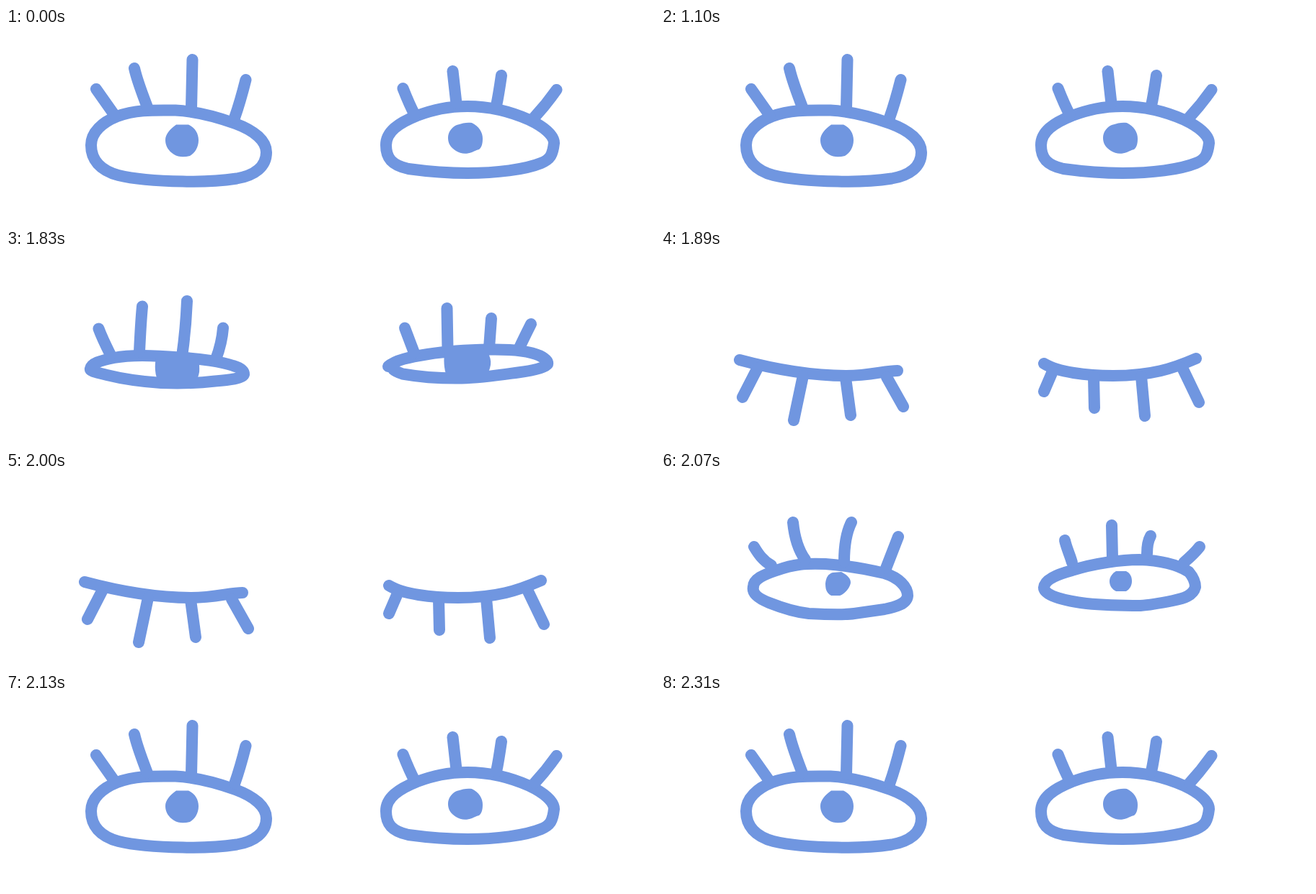
Animation of 900x270 px, one loop 2430 ms. Source, as an HTML page:

```html
<!DOCTYPE html>
<html lang="en">
<head>
<meta charset="utf-8">
<title>Blinking eyes</title>
<style>
  html, body { margin: 0; width: 100%; height: 100%; overflow: hidden; background: #fff; }
  svg { display: block; width: 900px; height: 270px; }

  .line { fill: none; stroke: #7096e0; stroke-width: 16; stroke-linecap: round; stroke-linejoin: round; }
  .pupil { fill: #7096e0; }

  /* One blink every 2430 ms; poses switch without blending. */
  .pose { visibility: hidden; animation: 2430ms step-end infinite; }
  .open { animation-name: open; }
  .closing { animation-name: closing; }
  .closed { animation-name: closed; }
  .opening { animation-name: opening; }

  @keyframes open {
    0% { visibility: visible; }
    75.3086% { visibility: hidden; }
    87.6543%, 100% { visibility: visible; }
  }
  @keyframes closing {
    0% { visibility: hidden; }
    75.3086% { visibility: visible; }
    77.7778%, 100% { visibility: hidden; }
  }
  @keyframes closed {
    0% { visibility: hidden; }
    77.7778% { visibility: visible; }
    85.1852%, 100% { visibility: hidden; }
  }
  @keyframes opening {
    0% { visibility: hidden; }
    85.1852% { visibility: visible; }
    87.6543%, 100% { visibility: hidden; }
  }
</style>
</head>
<body>
<svg viewBox="0 0 900 270">
  <g class="pose open">
    <path class="line" d="M118 163C118 145 134 131 154 123C178 114 200 114 235 114.5C262 116 290 123 318 133C345 143 361 157 361 173C361 193 345 205 320 209.5C290 214 262 214 245 213.5C215 213 180 211 156 205C130 198 118 183 118 163Z"/>
    <path class="line" d="M125 85L151 122M178 56C182 74 190 94 196 110M258.5 44L257 112M332.5 72C328 90 323 108 317 125"/>
    <path class="pupil" d="M236 134.5H253C262 138 267 147 267 156C267 166 262 174 255 178C247 180 239 180 233 176C225 171 221 164 221 156C221 148 227 141 236 134.5Z"/>

    <path class="line" d="M527 163C527 144 545 132 570 122C592 114 612 109 640 109C670 109 698 115.5 726 128C745 137 760 149 760 160C758 178 754 183 742 188C720 197 680 202 640 202C610 202 580 199 558 196C535 191 527 181 527 163Z"/>
    <path class="line" d="M550.5 84C556 98 561 110 567 121M619.5 60L624.5 105M687 66C685 80 683 94 680 108M763.5 86C755 98 743 113 733 124"/>
    <path class="pupil" d="M625 135C634 132 640 131 646 132C656 137 661 145 661 154C661 160 660 166 656 169C652 170 650 171 646 173C638 176 630 175 624 171C616 166 613 160 613 153C613 145 618 138 625 135Z"/>
  </g>

  <g class="pose closing">
    <path class="line" d="M117 165C118 158 130 154 150 150C170 146 200 146 240 149.5C270 151 300 156 315 161C325 164 330 168 330 173C328 179 310 181 290 182.5C265 185.5 240 186 215 185C185 183 160 179 140 174C125 170 116 169 117 165Z"/>
    <path class="line" d="M128.5 109.5C133 122 139 134 145 146M189 78.5C187 100 186 120 185 142M251 71C250 95 248 120 244 148M301 108.5C300 122 297 136 291 152"/>
    <path class="pupil" d="M208 150H266C268 156 268.5 163 268 170C267 176 265 180 262 184H212C206 175 206 160 208 150Z"/>

    <path class="line" d="M530 162C540 153 560 149 585 145C610 141 640 139 670 138.5C700 138 725 140 740 147C748 151 752 155 751 159C748 164 730 168 710 170.5C685 174 660 178 632 178.5C600 179 570 176 550 172.5C540 169 538 167 537 166"/>
    <path class="line" d="M553 108.5L566 143M611.5 81L612.5 138M673 95C672 110 671 122 670 136M728 103C722 115 717 125 712 136"/>
    <path class="pupil" d="M608 142H668C671 148 673 154 672 160C671 166 669 171 666 175H611C607 165 607 153 608 142Z"/>
  </g>

  <g class="pose closed">
    <path class="line" d="M109 153C150 164 205 175 257 175C290 175 310 168 328 168"/>
    <path class="line" d="M134 164L113 205M197 175L184 237M256 178L263 230M313 177L336 218"/>

    <path class="line" d="M531 158C550 170 590 175 627 175C680 175 710 165 742 151"/>
    <path class="line" d="M543 169L531 197M600 176L601 220M666 176L671 231M723 164L746 212"/>
  </g>

  <g class="pose opening">
    <path class="line" d="M128 160C128 149 142 143 160 137C185 128 200 127 228 128C255 130 285 135 310 141C330 147 342 160 342 172C341 184 325 188 310 191L268 197C255 199 225 198 205 197C185 195 165 188 150 182C135 176 126 169 128 160Z"/>
    <path class="line" d="M129 104C135 114 141 123 153 130M183 70C185 90 190 108 200 122M264 70C256 86 254 105 254 125M329 90L312 134"/>
    <path class="pupil" d="M238 140L250 139C256 142 263 147 263 154C262 162 254 170 248 172H236C229 168 228 162 228 155C229 146 232 142 238 140Z"/>

    <path class="line" d="M531 161C532 150 548 143 570 137C600 127 640 122 663 122C690 123 715 128 732 139C737 145 741 153 741 160C738 172 725 176 710 179C695 182 680 185 665 186C640 186 610 185 590 183C565 180 531 173 531 161Z"/>
    <path class="line" d="M560 95C562 105 567 115 570 126M625 74L626 120M679 89C675 96 674 105 674 114M747 104C740 113 732 120 725 126"/>
    <path class="pupil" d="M631 138H645C651 141 653 146 653 152C653 158 650 163 645 166H631C625 163 622 158 622 152C622 146 626 141 631 138Z"/>
  </g>
</svg>
</body>
</html>
```
